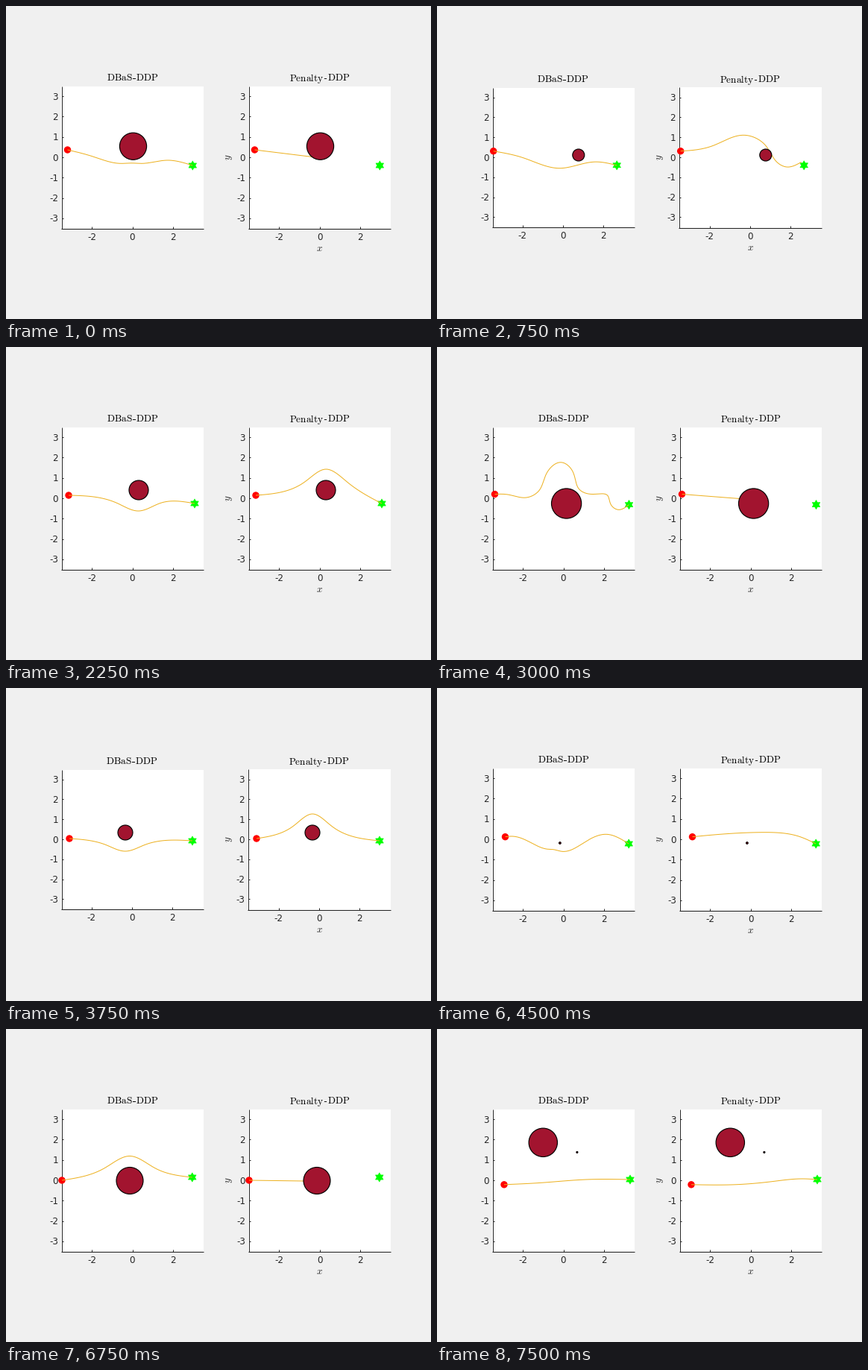
A matplotlib script that plays this animation: 570 by 420 pixels, repeating every 8000 ms.

```python
import numpy as np
import matplotlib.pyplot as plt
from matplotlib.animation import FuncAnimation
from matplotlib.patches import Circle, Polygon, Rectangle

W, H, DPI = 570, 420, 100
PT = 72 / DPI            # points per pixel
STEP, HOLD, FRAMES = 250, 3, 32
SHIFT = 251              # distance between the two panels
EM = 13.2
INK, LINE, WALL = "#262626", "#EDB120", "#A2142F"

plt.rcParams["font.family"] = "DejaVu Sans"
plt.rcParams["mathtext.fontset"] = "cm"

fig = plt.figure(figsize=(W / DPI, H / DPI), dpi=DPI, facecolor="#f0f0f0")
stages = []


def spline(points, per=24):
    """Natural cubic spline through the points, by chord length."""
    p = np.array(points, float)
    h = np.hypot(*np.diff(p, axis=0).T)
    n = len(p)
    a, b = np.eye(n), np.zeros((n, 2))
    for i in range(1, n - 1):
        a[i, i - 1:i + 2] = h[i - 1], 2 * (h[i - 1] + h[i]), h[i]
        b[i] = 6 * ((p[i + 1] - p[i]) / h[i] - (p[i] - p[i - 1]) / h[i - 1])
    m = np.linalg.solve(a, b)
    u = np.linspace(0, 1, per)[:, None]
    v = 1 - u
    return np.vstack([
        v * p[i] + u * p[i + 1]
        + h[i] ** 2 / 6 * ((v ** 3 - v) * m[i] + (u ** 3 - u) * m[i + 1])
        for i in range(n - 1)])


def detour(start, wall, side):
    """Way points that swing around a wall, side -1 above and 1 below."""
    x, y, r = wall
    peak = y + side * (r + 15)
    mid = (peak + start[1]) / 2
    return [(x - r - 16, mid), (x, peak), (x + r + 16, mid)]


def label(ax, x, y, text, size=12, color=INK, **kw):
    ax.text(x, y, text, fontsize=size * PT, color=color, **kw)


def stroke(ax, xs, ys, color=INK, z=2):
    return ax.plot(xs, ys, color=color, lw=PT, zorder=z,
                   solid_capstyle="butt", solid_joinstyle="round")[0]


def title(ax, cx, y, word, dash):
    x = cx + dash
    style = dict(size=EM, color="black", va="baseline")
    label(ax, x, y, rf"$\mathrm{{{word}}}$", ha="right", **style)
    label(ax, x + EM / 3, y, r"$\mathrm{DDP}$", ha="left", **style)
    ax.add_patch(Rectangle((x + 0.2, y - 3.3), 3.5, 0.9, fc="black", lw=0))


def panel(ax, k, tight):
    dx = k * SHIFT
    left, right = 74 + dx - k * tight, 265 + dx - tight * (1 - k) / 2
    top = 107.5 + tight * (2 - k / 2)
    bottom = 298 - tight * (2 - k)
    x0 = 169.5 + dx - tight / 2
    sx, sy = (27.2, 26.8) if tight else (27.3, 27.3)
    ax.add_patch(Rectangle((left, top), right - left, bottom - top,
                           fc="white", lw=0, zorder=0))
    edge, base = left + 0.5, bottom + 0.5
    stroke(ax, [edge, edge], [top, base + 0.5])
    stroke(ax, [left, right], [base, base])
    for v in (-2, 0, 2):
        x = x0 + v * sx
        stroke(ax, [x, x], [base, base - 2.4])
        label(ax, x, bottom + 16, str(v), ha="center", va="baseline")
    for v in range(-3, 4):
        y = 203 - v * sy
        stroke(ax, [edge, edge + 2.4], [y, y])
        label(ax, left - 3.8, y + 4.5, str(v), ha="right", va="baseline")
    word, dash = (("DBaS", -0.1), ("Penalty", 5.3))[k]
    title(ax, 170 + dx - tight, 100.5 + 2 * tight, word, dash)
    if k:
        label(ax, x0, bottom + 31, "$x$", EM, ha="center", va="baseline")
        label(ax, 300, 202.5, "$y$", EM, ha="center", va="center",
              rotation=90)
    return Rectangle((left, top), right - left, bottom - top,
                     transform=ax.transData)


def hexagram(x, y, r=6.2):
    i = np.arange(12)
    a = i * np.pi / 6
    rad = np.where(i % 2, r / np.sqrt(3), r)
    return Polygon(np.c_[x + rad * np.sin(a), y - rad * np.cos(a)],
                   fc="#00ff00", ec="#00ff00", lw=0.5 * PT, zorder=4)


def scene(start, goal, walls, dbas, penalty, tight=0, stops=False):
    """One trial; way points are in left-panel pixels for both methods."""
    ax = fig.add_axes([0, 0, 1, 1])
    ax.set(xlim=(0, W), ylim=(H, 0))
    ax.axis("off")
    routes = ([start, *dbas, goal],
              [start, *penalty] + ([] if stops else [goal]))
    for k, route in enumerate(routes):
        dx = k * SHIFT
        frame = panel(ax, k, tight)
        ax.add_patch(Circle((start[0] + dx, start[1]), 4.7, fc="red", lw=0,
                            zorder=4))
        ax.add_patch(hexagram(goal[0] + dx, goal[1]))
        for x, y, r in walls:
            ax.add_patch(Circle((x + dx, y), r, fc=WALL, ec="black",
                                lw=1.15 * PT, zorder=6))
        x, y = spline(route).T
        stroke(ax, x + dx, y, LINE, 5).set_clip_path(frame)
    stages.append(ax)


scene((82.5, 193), (250.3, 214), [(170.5, 188.2, 18.1)],
      [(115, 201.5), (154, 211.3), (168, 210.8), (182, 211.3), (216, 207)],
      [(160, 202.5)], stops=True)

scene((75.7, 194.7), (241.2, 213.8), [(189.8, 200, 8)],
      [(115, 203.5), (165, 217.7), (211, 209.2)],
      [(89, 193.8), (119, 187.5), (161, 173.3), (190, 187.5), (206, 210.5),
       (218, 216), (237.5, 209.5)], tight=1, stops=True)

scene((75.2, 198.5), (263.2, 207), [(244.6, 172, 15.2)],
      [(84.5, 206), (75, 215), (64, 204), (75, 186), (92, 175), (100.5, 157),
       (88, 138.5), (74, 136.7), (45, 180), (75, 226), (92, 230.2),
       (126, 213), (146, 188), (178, 174.5), (203, 192.5), (227, 216.8),
       (250, 205.8)],
      [(81.7, 203.5), (75, 208), (69, 202), (75, 196), (95, 190.8),
       (109, 179), (100, 168.3), (90.7, 178), (100, 188.3), (123, 173.5),
       (138, 166.8), (152, 175), (158, 194), (165, 211), (181, 218.6),
       (229, 202)])

begin, wall = (84, 199), (178, 192, 13)
scene(begin, (253, 210), [wall], detour(begin, wall, 1),
      detour(begin, wall, -1))

scene((77.5, 197.5), (257.5, 211.6), [(173.6, 210, 20.1)],
      [(95, 198), (120, 202), (137, 192.5), (147, 169.5), (166.5, 154.8),
       (182, 167), (190, 190), (208, 197.5), (229, 199.5), (233, 211),
       (243, 218.3)],
      [(155, 203.5)], stops=True)

begin, wall = (85, 202), (160, 194, 10)
scene(begin, (250, 205), [wall], detour(begin, wall, 1),
      detour(begin, wall, -1), tight=1)

scene((91.5, 199.7), (257.2, 209), [(164.9, 208, 1.3)],
      [(101, 199), (124, 206.5), (149, 216.3), (156, 216.7), (167, 219.2),
       (202, 204.5), (227, 196.3)],
      [(109, 198), (186, 193.7), (234, 199)])

begin, wall = (88, 201), (168, 210, 21)
scene(begin, (246, 203), [wall], detour(begin, wall, -1), [(148, 204)],
      stops=True)

scene((93.2, 205), (246.5, 194.7), [(165.3, 222.3, 7)],
      [(150, 202.4), (205, 200)],
      [(149, 200.3), (204, 196.3), (232, 196)])

begin, wall = (75, 203), (166, 203.5, 18)
scene(begin, (249.8, 199), [wall], detour(begin, wall, -1), [(149, 204)],
      stops=True)

scene((90, 208.8), (259, 202), [(142.3, 152.3, 19.2), (187.9, 165.4, 1)],
      [(140, 206.3), (200, 202)],
      [(149, 208.8), (199, 204.6), (239, 201)])


def draw(n):
    for i, ax in enumerate(stages):
        ax.set_visible(i == n // HOLD)
    return stages


anim = FuncAnimation(fig, draw, frames=FRAMES, interval=STEP,
                     init_func=lambda: draw(0), repeat=True, repeat_delay=0,
                     blit=False)
plt.show()
```
